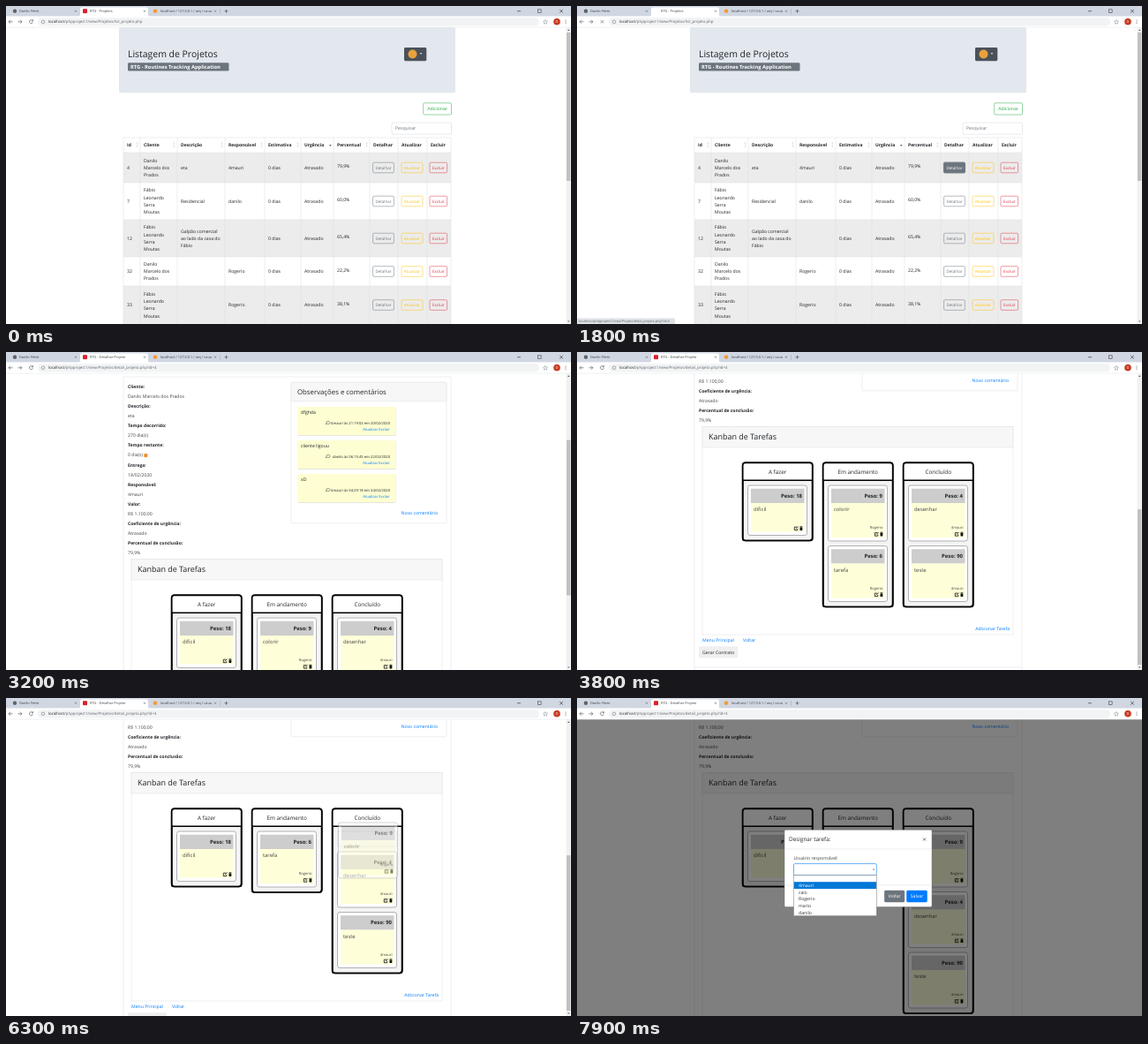
An HTML page for the animation above (8 s loop, 640 px wide and 360 px high).

```html
<!DOCTYPE html>
<html lang="pt-BR">
<head>
<meta charset="utf-8">
<title>Projetos</title>
<style>
  html, body { margin: 0; width: 100%; height: 100%; overflow: hidden; background: #fff; }
  svg { display: block; width: 100vw; height: 100vh; }
  text { font-family: "Open Sans", "Noto Sans", sans-serif; text-rendering: geometricPrecision; white-space: pre; }
</style>
</head>
<body>
<svg id="stage" viewBox="0 0 640 360"></svg>
<script>
const LOOP = 8000;
const BLUE = '#007bff', GREY = '#6c757d', GRID = '#dee2e6', INK = '#212529';
const USERS = ['4mauri', 'caio', 'Rogerio', 'mario', 'danilo'];
const APP = 'RTG';

// Timeline in ms
const HOVER = 900, STATUS = 1000, CLICK = 1300, LOADING = 1600, NAVIGATE = 2000;
const DRAG = 5850, DRAG_END = 6300, DROP = 6400, MODAL = 6450, OPEN = 7550, PICK = 7750;

const clamp = v => Math.min(1, Math.max(0, v));
const progress = (t, from, to) => clamp((t - from) / (to - from));
const smooth = p => p * p * (3 - 2 * p);

// Drawing helpers; text y is the middle of the line
const text = (s, x, y, { size = 5.15, fill = INK, weight = 400, anchor = 'start' } = {}) =>
  `<text x="${x}" y="${y + size * .34}" font-size="${size}" fill="${fill}" font-weight="${weight}" text-anchor="${anchor}">${s}</text>`;
const bold = (s, x, y, o) => text(s, x, y, { size: 5, weight: 700, ...o });
const rect = (x, y, w, h, fill, { stroke = 'none', sw = .5, r = 0, extra = '' } = {}) =>
  `<rect x="${x}" y="${y}" width="${w}" height="${h}" rx="${r}" fill="${fill}" stroke="${stroke}" stroke-width="${sw}" ${extra}/>`;
const circle = (x, y, r, fill) => `<circle cx="${x}" cy="${y}" r="${r}" fill="${fill}"/>`;
const path = (d, stroke, sw = .6, fill = 'none') => `<path d="${d}" stroke="${stroke}" stroke-width="${sw}" fill="${fill}"/>`;
const group = (dx, dy, body, opacity = 1) => `<g transform="translate(${dx} ${dy})" opacity="${opacity}">${body}</g>`;
const cross = (x, y, r, color, sw) => path(`M${x - r} ${y - r}l${2 * r} ${2 * r}m0 ${-2 * r}l${-2 * r} ${2 * r}`, color, sw);
const caret = (x, y, color, r = 1.4) => path(`M${x - r} ${y - r / 2}h${2 * r}l${-r} ${r}z`, 'none', 0, color);

const button = (label, x, y, w, h, { color, fill = 'none', ink = color, size = 5.15 }) =>
  rect(x, y, w, h, fill, { stroke: color, r: 1.3 }) + text(label, x + w / 2, y + h / 2, { size, fill: ink, anchor: 'middle' });

function browser(t) {
  const detail = t >= NAVIGATE, loading = t >= CLICK && !detail;
  const tabText = (s, x) => text(s, x, 5.8, { size: 3.9, fill: '#3c4043' });
  const title = APP + (detail ? ' - Detalhar Projeto' : ' - Projetos');
  const url = '/phpproject1/view/Projetos/' + (detail ? 'detail_projeto.php?id=4' : 'list_projeto.php');
  return rect(0, 0, 640, 12, '#d0d7e2') + rect(0, 11.5, 640, 12.7, '#fff')
    + path('M82 12Q84 12 84 9V3.5Q84 1.5 86 1.5H159Q161 1.5 161 3.5V9Q161 12 163 12Z', 'none', 0, '#fff')
    + circle(10, 5.8, 2.2, '#5f6368') + tabText('Danilo Férez', 15)
    + (t >= LOADING && !detail ? '' : rect(87, 3.2, 5, 5, '#d8232f', { r: .8 })) + tabText(title, 95)
    + circle(169, 5.8, 2.3, '#f29b38') + tabText('localhost / 127.0.0.1 / arq / usuu', 175)
    + [79, 157, 237].map(x => cross(x, 5.8, 1.1, '#5f6368', .5)).join('')
    + path('M242.500 3v6', '#9aa0a6', .4) + path('M247.500 5.800h4m-2-2v4', '#3c4043', .6)
    + path('M579 5.800h4', '#222', .6) + rect(602.5, 3.9, 3.6, 3.6, 'none', { stroke: '#222' }) + cross(629, 5.8, 1.8, '#222', .6)
    + path('M7.500 17.800h-4.500m2-2l-2 2l2 2', '#5f6368', .7) + path('M13.500 17.800h4.500m-2-2l2 2l-2 2', '#5f6368', .7)
    + (loading ? cross(28.5, 17.8, 1.6, '#5f6368', .7)
      : path('M30 16.500a2 2 0 1 0 .400 1.800M30.500 15.200v1.800h-1.800', '#5f6368', .7))
    + rect(36, 13.2, 568, 9.4, '#f1f3f4', { r: 4.7 })
    + `<circle cx="42" cy="17.900" r="1.800" fill="none" stroke="#5f6368" stroke-width=".5"/>`
    + `<text x="48" y="19.400" font-size="4.350" fill="#202124">localhost<tspan fill="#5f6368">${url}</tspan></text>`
    + path('M611 15.500l.700 1.600l1.800 .200l-1.300 1.200l.400 1.800l-1.600-.900l-1.600 .900l.400-1.800l-1.300-1.200l1.800-.200z', '#5f6368', .4)
    + circle(624, 17.8, 3.8, '#c5391f') + text('D', 624, 17.8, { size: 4, fill: '#fff', anchor: 'middle' })
    + [16, 17.8, 19.6].map(y => circle(634, y, .5, '#5f6368')).join('')
    + path('M0 24.200H640', '#dadce0', .4);
}

function scrollbar(scroll, pageHeight) {
  const scale = 324 / pageHeight;
  return rect(634.5, 24, 5.5, 336, '#f1f1f1')
    + rect(635, 30 + scroll * scale, 4.5, 336 * scale, '#c1c1c1')
    + path('M636 28l1.300-1.400l1.300 1.400z', 'none', 0, '#505050') + caret(637.3, 357.2, '#505050', 1.3);
}

const banner = title => rect(128, 24, 381, 74.3, '#e3e7ee', { r: 1.5 })
  + text(title, 138, 54, { size: 10.46 })
  + rect(138, 64.3, 114.5, 9.3, GREY, { r: 1.3 })
  + bold(APP + ' - Routines Tracking Application', 141, 69, { size: 5.78, fill: '#fff' })
  + rect(451, 47, 25.3, 15.2, '#4a5159', { r: 1.4 }) + circle(460.5, 54.5, 5, '#e9a23b') + caret(470, 54, '#fff');

const COLUMNS = [133, 152, 194, 248, 293, 334, 371, 412, 444, 477, 504];
const HEADINGS = ['Id', 'Cliente', 'Descrição', 'Responsável', 'Estimativa', 'Urgência', 'Percentual', 'Detalhar', 'Atualizar', 'Excluir'];
const CLIENT_A = ['Danilo', 'Marcelo dos', 'Prados'], CLIENT_B = ['Fábio', 'Leonardo', 'Serra', 'Moutas'];
const ROWS = [
  { id: 4, top: 166, bottom: 200, client: CLIENT_A, about: ['eta'], owner: USERS[0], done: '79,9%' },
  { id: 7, top: 200, bottom: 242, client: CLIENT_B, about: ['Residencial'], owner: USERS[4], done: '60,0%' },
  { id: 12, top: 242, bottom: 284, client: CLIENT_B, about: ['Galpão comercial', 'ao lado da casa do', 'Fábio'], owner: '', done: '65,4%' },
  { id: 32, top: 284, bottom: 317, client: CLIENT_A, about: [], owner: USERS[2], done: '22,2%' },
  { id: 33, top: 317, bottom: 360, client: CLIENT_B, about: [], owner: USERS[2], done: '38,1%' },
];

function tableRow(row, index, t) {
  const mid = (row.top + row.bottom) / 2;
  const cell = (lines, col) => lines.map((s, i) =>
    text(s, COLUMNS[col] + 4, mid + (i - (lines.length - 1) / 2) * 8.2)).join('');
  const hover = index ? 0 : progress(t, HOVER, HOVER + 150);
  const ring = !index && t >= CLICK ? rect(414.8, mid - 6.6, 25.4, 13.2, '#b5babe', { r: 1.8 }) : '';
  const action = (label, x, w, color) => button(label, x, mid - 5.8, w, 11.6, { color, size: 4.5 });
  return rect(133, row.top, 371, row.bottom - row.top, index % 2 ? '#fff' : '#ececec')
    + path(`M133 ${row.top}H504`, GRID)
    + [[row.id], row.client, row.about, [row.owner], ['0 dias'], ['Atrasado']].map(cell).join('')
    + text(row.done, 375, mid - 1.5) + ring + action('Detalhar', 415.6, 23.8, GREY)
    + (hover ? `<g opacity="${hover}">` + button('Detalhar', 415.6, mid - 5.8, 23.8, 11.6, { color: GREY, fill: GREY, ink: '#fff', size: 4.5 }) + '</g>' : '')
    + action('Atualizar', 448, 24, '#ffc107') + action('Excluir', 480, 19.6, '#dc3545');
}

function listPage(t) {
  const sorters = COLUMNS.slice(1, 8).map((x, i) => i === 5 ? caret(x - 3.7, 158, '#333', 1.3)
    : path(`M${x - 3.5} 154.500v5m-.900-4l.900-1l.900 1m-1.800 3l.900 1l.900-1`, '#c4c8cc', .4)).join('');
  return banner('Listagem de Projetos')
    + button('Adicionar', 472.7, 109.8, 31.8, 13.2, { color: '#28a745' })
    + rect(437, 132, 67.5, 13.2, '#fff', { stroke: '#ced4da', r: 1.3 }) + text('Pesquisar', 441, 138.6, { fill: GREY })
    + HEADINGS.map((s, i) => bold(s, COLUMNS[i] + 4, 157.3)).join('') + sorters
    + ROWS.map((row, i) => tableRow(row, i, t)).join('')
    + path('M133 149H504' + COLUMNS.map(x => `M${x} 149V360`).join(''), GRID)
    + scrollbar(0, 648)
    + (t >= STATUS ? rect(0, 353.5, 111, 7, '#dee1e6', { r: .8 })
      + text('localhost/phpproject1/view/Projeto/detal_projeto.php?id=4', 2, 357, { size: 3.75, fill: '#5f6368' }) : '');
}

const FIELDS = [
  ['Cliente:', 'Danilo Marcelo dos Prados'], ['Descrição:', 'eta'], ['Tempo decorrido:', '270 dia(s)'],
  ['Tempo restante:', '0 dia(s)'], ['Entrega:', '18/02/2020'], ['Responsável:', USERS[0]], ['Valor:', 'R$ 1.100,00'],
  ['Coeficiente de urgência:', 'Atrasado'], ['Percentual de conclusão:', '79,9%'],
];
const COMMENTS = [
  ['dfghda', USERS[0] + ' às 21:19:02 em 20/02/2020'],
  ['cliente ligouu', USERS[4] + ' às 06:15:45 em 22/02/2020'],
  ['xD', USERS[0] + ' às 04:29:18 em 24/02/2020'],
];

function comment([body, meta], i) {
  const small = { size: 4.15, anchor: 'end' };
  return group(0, i * 38, rect(330.5, 62.5, 111, 32.5, '#e6e6dc', { r: 1 }) + rect(330, 62, 111, 32, '#fefed2', { r: 1 })
    + text(body, 334, 68)
    + path('M364.500 78.500a2 1.600 0 1 1 -.800 2.700l-1.400 .600l.600-1.300a2 1.600 0 0 1 1.600-2z', '#333', .5)
    + text(meta, 435, 80.3, small) + text('Atualizar Excluir', 435, 88, { ...small, fill: BLUE }));
}

const COLUMN_X = [187, 278, 369], CARD_TOP = 151, PITCH = 68.5, GAP = 23;
const TASK = {
  hard: { name: 'dificil', weight: 18, owner: '', height: 56.5 },
  paint: { name: 'colorir', weight: 9, owner: USERS[2], height: 63 },
  task: { name: 'tarefa', weight: 6, owner: USERS[2], height: 63 },
  draw: { name: 'desenhar', weight: 4, owner: USERS[0], height: 63 },
  test: { name: 'teste', weight: 90, owner: USERS[0], height: 63 },
};

function card({ name, weight, owner, height }, x, y, opacity = 1) {
  const base = height - 8;
  return group(x, y, rect(6.5, 0, 67, height, '#fff', { stroke: '#a9a9ae', sw: .9, r: 2.5 })
    + rect(10, 3.7, 60.5, 16.3, '#cdcdcd') + rect(10, 20, 60.5, height - 24, '#fefed9')
    + bold('Peso: ' + weight, 68, 11.7, { size: 5.95, anchor: 'end' })
    + text(name, 13, 27, { size: 5.9, fill: '#444' })
    + text(owner, 68.5, base - 7, { size: 4.1, fill: '#444', anchor: 'end' })
    + path(`M62.300 ${base - 1.4}h-3v3.600h3.500v-1.700M60.800 ${base + .8}l2.800-2.800`, '#111', .8)
    + path(`M65.300 ${base - 1.6}h3.200M66.400 ${base - 2}h1`, '#111', .7) + rect(65.5, base - .9, 2.8, 3.3, '#111', { r: .3 }), opacity);
}

// A null task is the drop placeholder.
function column(title, x, tasks) {
  let y = CARD_TOP, body = '';
  for (const task of tasks) {
    body += task ? card(task, x, y) : rect(x + 7, y, 66.5, 17, 'none', { stroke: '#999', extra: 'stroke-dasharray="1 1"' });
    y += task ? task.height + PITCH - 63 : GAP;
  }
  const bottom = y + .5, frame = { stroke: '#000', sw: 1.7, r: 3 };
  return rect(x + .7, 125.3, 79, bottom - 125.3, '#f4f4f4', frame)
    + rect(x + .7, 125.3, 79, 20, '#fff', { r: 3 }) + rect(x + .7, 125.3, 79, bottom - 125.3, 'none', frame)
    + path(`M${x} 145.300h80`, '#000', 1.5)
    + text(title, x + 40.2, 135.8, { size: 6.35, weight: 500, anchor: 'middle' }) + body;
}

function kanban(t) {
  const { hard, paint, task, draw, test } = TASK;
  const p = smooth(progress(t, DRAG, DRAG_END));
  const dragging = t >= DRAG && t < DROP, crossed = p > .5;
  const slot = dragging ? null : paint;
  const moved = crossed || t >= DROP;
  const shift = moved ? (dragging ? GAP : PITCH) : 0;
  const link = (s, x, y, anchor) => text(s, x, y, { fill: BLUE, anchor });
  return rect(142, 84.3, 352, 235.7 + shift, '#fff', { stroke: '#dfdfdf' }) + rect(142, 84.3, 352, 23.7, '#f7f7f7', { stroke: '#dfdfdf' })
    + text('Kanban de Tarefas', 149, 95.8, { size: 8.95 })
    + column('A fazer', COLUMN_X[0], [hard])
    + column('Em andamento', COLUMN_X[1], moved ? [task] : [slot, task])
    + column('Concluído', COLUMN_X[2], moved ? [slot, draw, test] : [draw, test])
    + (dragging ? card(paint, COLUMN_X[1] + 92 * p, CARD_TOP - 10 * p, .55) : '')
    + group(0, shift, link('Adicionar Tarefa', 490, 313.3, 'end') + link('Menu Principal', 142, 326.5) + link('Voltar', 188, 326.5)
      + rect(138, 333.3, 44.2, 13, '#efefef', { r: 1.3 }) + text('Gerar Contrato', 160.1, 339.9, { anchor: 'middle' })
      + path('M133 357H504', GRID));
}

function detailPage(t) {
  const scroll = 133 * smooth(progress(t, 2500, 3150)) + 150 * smooth(progress(t, 3350, 3750));
  const fields = FIELDS.map(([label, value], i) => bold(label, 138, 39 + i * 22.2) + text(value, 138, 50.1 + i * 22.2, { fill: '#444' })).join('');
  const body = group(0, -133, banner('Detalhar Projeto'))
    + path('M133 28H504M133 28V580M504 28V580', '#e2e4e7') + fields
    + rect(156.3, 115, 4, 4.2, '#f0922b', { r: 1.2 })
    + rect(323, 34.3, 176, 159.5, '#fff', { stroke: '#dfdfdf', r: 1 }) + rect(323, 34.3, 176, 21.5, '#f7f7f7', { stroke: '#dfdfdf', r: 1 })
    + text('Observações e comentários', 330, 45, { size: 7.81 })
    + COMMENTS.map(comment).join('') + text('Novo comentário', 489, 182.2, { fill: BLUE, anchor: 'end' })
    + group(0, 150, kanban(t));
  return group(0, 133 - scroll, body) + (t < MODAL ? scrollbar(scroll, 619) : modal(t));
}

function dropdown(t) {
  const active = t >= PICK ? 1 : 0;
  return rect(245.5, 200.7, 93.8, 46, '#fff', { stroke: '#777' })
    + rect(245.8, 200.4 + active * 7.8, 93.2, 7.8, '#0078d7')
    + ['', ...USERS].map((s, i) => text(s, 251, 204.3 + i * 7.75, { fill: i === active ? '#fff' : '#333' })).join('');
}

function modal(t) {
  const open = t >= OPEN;
  const slide = -16.7 * (1 - progress(t, 6500, 6890)) ** 1.45;
  const box = rect(235, 149.3, 167, 87.2, '#fff', { stroke: '#777', r: 1.5 })
    + text('Designar tarefa:', 240, 160.3, { size: 6.4, weight: 500 }) + cross(393.5, 160, 1.5, '#555', .8)
    + path('M235 171H402M235 212H402', GRID)
    + text('Usuário responsável:', 245.5, 181, { fill: '#444' })
    + rect(245.5, 187.6, 93.8, 13, '#fff', { stroke: open ? '#58a8f5' : '#ced4da', sw: open ? .9 : .5, r: 1.2 }) + caret(336, 194.3, '#444', 1.2)
    + button('Voltar', 348.3, 218, 22.6, 13, { color: GREY, fill: GREY, ink: '#fff' })
    + button('Salvar', 373.5, 218, 23, 13, { color: BLUE, fill: BLUE, ink: '#fff' })
    + (open ? dropdown(t) : '');
  return rect(0, 24, 640, 336, '#000', { extra: `opacity="${.5 * progress(t, MODAL, 6600)}"` })
    + group(0, slide, box, progress(t, 6500, 6650));
}

const stage = document.getElementById('stage');
let shown = '';
function render(now) {
  const t = now % LOOP;
  const markup = (t < NAVIGATE ? listPage(t) : detailPage(t)) + browser(t);
  if (markup !== shown) stage.innerHTML = shown = markup;
}
const start = performance.now();
function tick() {
  render(performance.now() - start);
  requestAnimationFrame(tick);
}
tick();
</script>
</body>
</html>
```
